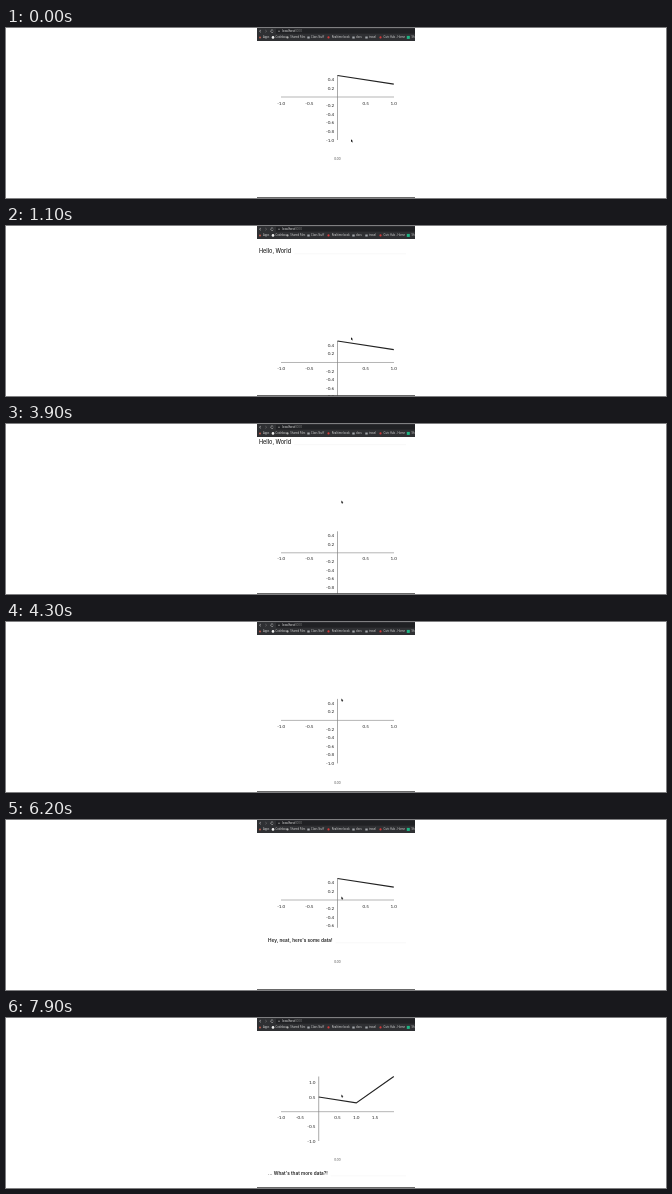
An HTML page with a canvas that plays this animation: 660 px wide and 170 px high, repeating every 8 s.

```html
<!DOCTYPE html>
<html lang="en">
<head>
<meta charset="utf-8">
<title>Scrolling chart</title>
<style>
  html, body { margin: 0; width: 100%; height: 100%; overflow: hidden; background: #fff; }
  canvas { display: block; width: 660px; height: 170px; }
</style>
</head>
<body>
<canvas id="stage"></canvas>
<script>
const LOOP = 8000;
const canvas = document.getElementById('stage');
const ctx = canvas.getContext('2d');
const scale = window.devicePixelRatio || 1;
canvas.width = 660 * scale;
canvas.height = 170 * scale;

// Keyframes: [time, value]
const FIGURE_TOP = [[0, 47.5], [500, 53], [900, 67.5], [1000, 92], [1100, 115], [1300, 112.5], [1500, 110],
  [1800, 108.5], [3850, 108.5], [4000, 105], [4200, 87], [4400, 67], [4600, 58.5]];
const TITLE_Y = [[0, -42], [900, -22], [1000, 3], [1100, 25], [1300, 22.5], [1500, 20.5],
  [1800, 19], [3850, 19], [4000, 15.5], [4200, -2.5], [4400, -22], [4600, -31]];
const STEP_Y = [[5600, 176], [5700, 158], [6200, 120], [6500, 104], [7000, 48], [7400, 6], [7900, 3]];
const STEP_GAP = 152;
const CURSOR_X = [[1200, 345], [1800, 340], [2500, 335.4]];
const CURSOR_Y = [[1200, 111.3], [1800, 76], [2500, 76.6]];

const FIRST = { xMax: 1, yMax: .5, points: [[0, .5], [1, .3]],
  xTicks: [-1, -.5, .5, 1], yTicks: [.4, .2, -.2, -.4, -.6, -.8, -1] };
const SECOND = { xMax: 2, yMax: 1.2, points: [[0, .5], [1, .3], [2, 1.2]],
  xTicks: [-1, -.5, .5, 1, 1.5], yTicks: [1, .5, -.5, -1] };

function at(keys, t) {
  if (t <= keys[0][0]) return keys[0][1];
  for (let i = 1; i < keys.length; i++) {
    const [t0, a] = keys[i - 1], [t1, b] = keys[i];
    if (t <= t1) return a + (b - a) * (t - t0) / (t1 - t0);
  }
  return keys[keys.length - 1][1];
}

function easeCubic(start, t) {
  const u = Math.min(1, Math.max(0, (t - start) / 1000));
  return u < .5 ? 4 * u ** 3 : 1 - 4 * (1 - u) ** 3;
}

function rect(x, y, w, h, color) {
  ctx.fillStyle = color;
  ctx.fillRect(x, y, w, h);
}

function dot(x, y, r, color) {
  ctx.fillStyle = color;
  ctx.beginPath();
  ctx.arc(x, y, r, 0, 7);
  ctx.fill();
}

function stroke(points, color, width) {
  ctx.strokeStyle = color;
  ctx.lineWidth = width;
  ctx.beginPath();
  points.forEach(([x, y]) => ctx.lineTo(x, y));
  ctx.stroke();
}

function text(str, x, y, font, color, align = 'left') {
  ctx.font = font;
  ctx.fillStyle = color;
  ctx.textAlign = align;
  ctx.textBaseline = 'alphabetic';
  ctx.fillText(str, x, y);
}

function drawChart(data, top, progress) {
  const label = '4.6px Lato, sans-serif';
  const px = x => 275.2 + (x + 1) / (data.xMax + 1) * 112.6;
  const py = y => top + (data.yMax - y) / (data.yMax + 1) * 64.5;
  const x0 = px(0), y0 = py(0);
  stroke([[275, y0], [388, y0]], '#969696', .7);
  stroke([[x0, top], [x0, top + 64.5]], '#858585', .7);
  data.xTicks.forEach(v => text(v.toFixed(1), px(v), y0 + 7.6, label, '#222', 'center'));
  data.yTicks.forEach(v => text(v.toFixed(1), x0 - 3.4, py(v) + 1.6, label, '#222', 'right'));
  text('0.00', 331.4, top + 84.6, '3.2px Lato, sans-serif', '#555', 'center');
  if (!progress) return;

  const line = data.points.map(([x, y]) => [px(x), py(y)]);
  let length = 0;
  for (let i = 1; i < line.length; i++)
    length += Math.hypot(line[i][0] - line[i - 1][0], line[i][1] - line[i - 1][1]);
  ctx.setLineDash([length * progress, length + 1]);
  stroke(line, '#222', 1.15);
  ctx.setLineDash([]);
}

function drawHeading(str, x, y, font) {
  rect(252, y - 12.2, 157, 24, '#fff');
  text(str, x, y + 1.8, font, '#202020');
  const end = x + ctx.measureText(str).width;
  stroke([[end + 3, y + 2.8], [400, y + 2.8]], '#f3f3f3', .5);
}

function drawBrowser(loading) {
  const small = '2.7px "Open Sans", sans-serif';
  rect(251, 0, 158, 13, '#2f3033');
  rect(270, .8, 139, 4.8, '#202124');
  stroke([[255, 2], [253.4, 3.2], [255, 4.4]], '#d0d0d0', .5);
  stroke([[259.2, 2], [260.8, 3.2], [259.2, 4.4]], '#777', .5);
  if (loading) {
    stroke([[265, 2.1], [267.2, 4.3]], '#ddd', .5);
    stroke([[267.2, 2.1], [265, 4.3]], '#ddd', .5);
  } else {
    ctx.beginPath();
    ctx.arc(266.1, 3.2, 1.3, .5, 5.6);
    ctx.strokeStyle = '#ddd';
    ctx.lineWidth = .5;
    ctx.stroke();
  }
  dot(273, 3.2, .8, '#8c8c8c');
  text('localhost', 276, 4.2, '3.1px "Open Sans", sans-serif', '#f0f0f0');
  text(':3000', 288, 4.2, '3.1px "Open Sans", sans-serif', '#8b8b8b');

  dot(254, 9.4, 1, '#c05a4c');
  dot(267, 9.4, 1.3, '#eee');
  dot(281.5, 9.4, 1.1, '#aaa');
  [302.5, 347.5, 360.5].forEach(x => rect(x - 1.2, 8.5, 2.4, 2, '#a4a7ab'));
  dot(322.5, 9.4, 1.1, '#d33a3a');
  dot(374.5, 9.4, 1.1, '#d33a3a');
  rect(400.8, 7.9, 3, 3, '#1fb584');
  [['Apps', 257], ['Codebox', 269.5], ['Shared Files', 284.3], ['Class Stuff', 305],
   ['Realtime book', 325.7], ['docs', 350], ['travel', 363], ['Civic Hub - Home', 377.5],
   ['Sh', 405.5]].forEach(([name, x]) => text(name, x, 10.4, small, '#ddd'));
}

function drawCursor(x, y) {
  ctx.beginPath();
  [[0, 0], [0, 2.8], [.7, 2.2], [1.1, 3.1], [1.6, 2.9], [1.2, 2], [2, 2]]
    .forEach(([dx, dy]) => ctx.lineTo(x + dx, y + dy));
  ctx.closePath();
  ctx.fillStyle = '#111';
  ctx.fill();
}

function draw(t) {
  ctx.setTransform(scale, 0, 0, scale, 0, 0);
  rect(0, 0, 660, 170, '#fff');
  ctx.save();
  ctx.beginPath();
  ctx.rect(251, 0, 158, 170);
  ctx.clip();

  const blank = t >= 3200 && t < 3400;
  if (!blank) {
    const second = t >= 6900;
    const progress = t < 3200 ? 1 : easeCubic(second ? 6900 : 4555, t);
    drawChart(second ? SECOND : FIRST, at(FIGURE_TOP, t), progress);
    drawHeading('Hello, World', 253, at(TITLE_Y, t), '500 5.5px Inter, sans-serif');
    if (t > 5600) {
      const y = at(STEP_Y, t), font = '600 4.7px Inter, sans-serif';
      drawHeading("Hey, neat, here's some data!", 262, y, font);
      drawHeading("... What's that more data?!", 262, y + STEP_GAP, font);
    }
  }
  drawBrowser(t >= 2700 && t < 3700);
  drawCursor(at(CURSOR_X, t), at(CURSOR_Y, t));
  rect(251, 169, 158, .8, '#444');
  ctx.restore();
}

const start = performance.now();
function frame() {
  draw((performance.now() - start) % LOOP);
  requestAnimationFrame(frame);
}
frame();
</script>
</body>
</html>
```
